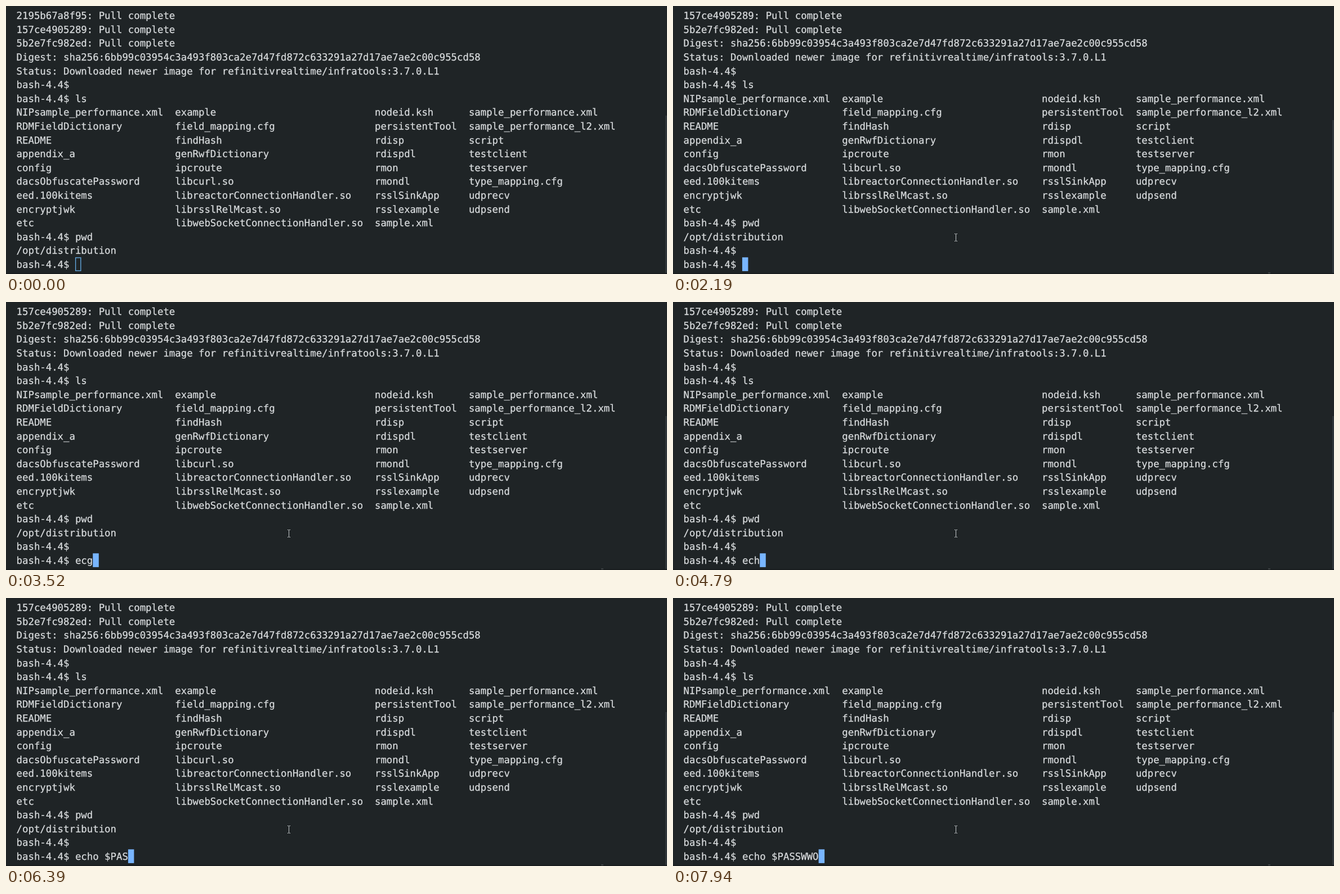
An HTML page for the animation above (8000 ms loop, 1174 px wide and 477 px high).

```html
<!DOCTYPE html>
<html lang="en">
<head>
<meta charset="utf-8">
<title>Terminal</title>
<style>
  html, body { margin: 0; width: 100%; height: 100%; overflow: hidden; background: #1f2426; }
  #stage { position: relative; width: 1174px; height: 477px; overflow: hidden; background: #1f2426; }
  #stage > * { position: absolute; }
  #screen {
    left: 18.6px; top: 6.2px; margin: 0; color: #dadddf;
    font: 17.34px/24.6px "DejaVu Sans Mono", monospace;
    -webkit-text-stroke: 0.25px #dadddf;
    font-variant-ligatures: none; text-rendering: geometricPrecision; white-space: pre;
  }
  #overlay { left: 0; top: 0; }
  #cursor { fill: none; stroke: #67b0ea; stroke-width: 1.3; }
  #cursor.focus { fill: #78b5ff; stroke: #78b5ff; }
  #thumb { right: 0; width: 3px; bottom: 2px; background: #30363a; }
  #edge { left: 0; bottom: 0; width: 100%; height: 2px; background: #191d1f; }
  #speck { left: 1057px; top: 474px; width: 4px; height: 2px; background: #3b4042; }
</style>
</head>
<body>
<div id="stage">
  <pre id="screen"></pre>
  <div id="thumb"></div>
  <div id="edge"></div>
  <div id="speck"></div>
  <svg id="overlay" width="1174" height="477">
    <rect id="cursor" y="448" width="9.2" height="23.2"/>
    <path id="pointer" d="M-3-6.5H-1M0-6.5H2M-.5-6V6M-3 6.5H-1M0 6.5H2" fill="none" stroke="#c5c9cb"/>
  </svg>
</div>
<script>
const LOOP = 8000, CELL = 17.34 * 0.602, LEFT = 18.6;
const PROMPT = 'bash-4.4$ ';
const COLUMNS = [0, 27, 61, 77];
const FILES = [
  'NIPsample_performance.xml example nodeid.ksh sample_performance.xml',
  'RDMFieldDictionary field_mapping.cfg persistentTool sample_performance_l2.xml',
  'README findHash rdisp script',
  'appendix_a genRwfDictionary rdispdl testclient',
  'config ipcroute rmon testserver',
  'dacsObfuscatePassword libcurl.so rmondl type_mapping.cfg',
  'eed.100kitems libreactorConnectionHandler.so rsslSinkApp udprecv',
  'encryptjwk librsslRelMcast.so rsslexample udpsend',
  'etc libwebSocketConnectionHandler.so sample.xml'
];
const listing = FILES.map(row =>
  row.split(' ').reduce((line, name, i) => line.padEnd(COLUMNS[i]) + name, ''));
const lines = [
  '2195b67a8f95: Pull complete',
  '157ce4905289: Pull complete',
  '5b2e7fc982ed: Pull complete',
  'Digest: sha256:6bb99c03954c3a493f803ca2e7d47fd872c633291a27d17ae7ae2c00c955cd58',
  'Status: Downloaded newer image for refinitivrealtime/infratools:3.7.0.L1',
  PROMPT,
  PROMPT + 'ls',
  ...listing,
  PROMPT + 'pwd',
  '/opt/distribution'
];

// Key presses; '<' is backspace.
const KEYS = [
  [3120, 'e'], [3390, 'c'], [3520, 'g'], [4190, '<'], [4790, 'h'], [5110, 'o'],
  [5390, ' '], [5720, '$'], [5990, 'P'], [6120, 'A'], [6390, 'S'], [6520, 'S'],
  [7050, 'W'], [7120, 'W'], [7320, 'O'], [7390, 'R'], [7940, '<']
];
const ENTER = 2190, FOCUS = 800, NUDGE = 730, MOVE = 200, STEP = 68;

const el = id => document.getElementById(id);
const output = el('screen'), cursor = el('cursor'), thumb = el('thumb');
const speck = el('speck'), pointer = el('pointer');

function typed(t) {
  let text = '';
  for (const [time, key] of KEYS) {
    if (t < time) break;
    text = key === '<' ? text.slice(0, -1) : text + key;
  }
  return text;
}

function pointerAt(t) {
  if (t >= NUDGE && t < FOCUS) return [506, 409];
  const k = Math.min(5, Math.floor((t - MOVE) / STEP + 0.05)) / 5;
  const rest = (1 - k) ** 2;
  return [503 + 556 * rest, 412 + 69 * rest];
}

let shown = '';
function render(t) {
  const entered = t >= ENTER;
  const line = PROMPT + typed(t);
  const rows = entered ? [...lines.slice(1), PROMPT, line] : [...lines, line];
  const text = rows.join('\n');
  if (text !== shown) output.textContent = shown = text;

  cursor.setAttribute('x', LEFT + line.length * CELL + 0.6);
  cursor.classList.toggle('focus', t >= FOCUS);
  thumb.style.top = (entered ? 203 : 195) + 'px';

  const visible = t >= MOVE ? 'visible' : 'hidden';
  speck.style.visibility = pointer.style.visibility = visible;
  const [x, y] = pointerAt(Math.max(t, MOVE));
  pointer.setAttribute('transform', `translate(${Math.round(x)} ${Math.round(y)})`);
}

const start = performance.now();
function tick() {
  render((performance.now() - start) % LOOP);
  requestAnimationFrame(tick);
}
tick();
</script>
</body>
</html>
```
